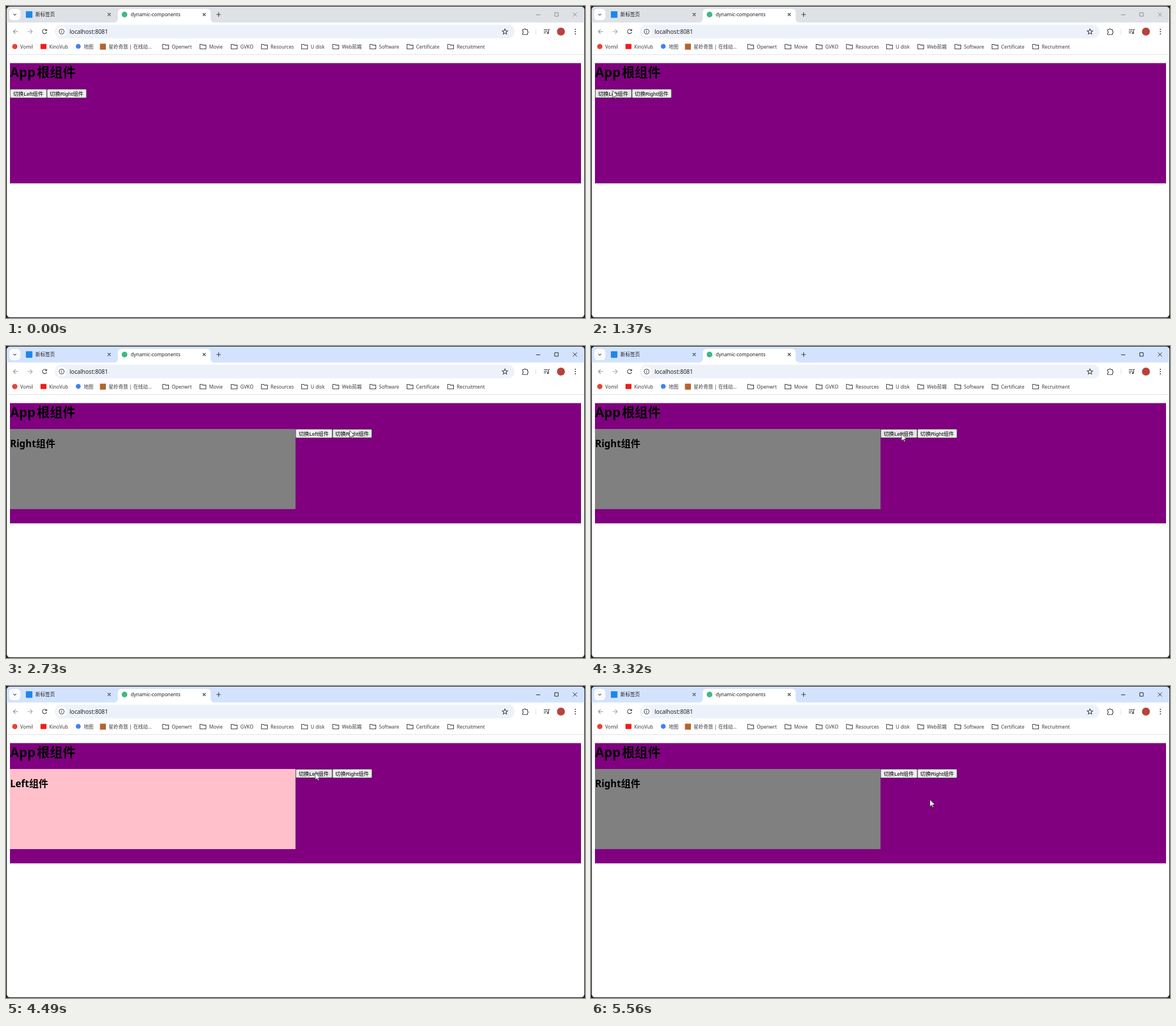
These frames come from a looping animation (1020 px wide and 549 px high, 5.6 s). An HTML page:

```html
<!DOCTYPE html>
<html lang="zh-CN">
<head>
<meta charset="utf-8">
<title>dynamic-components</title>
<style>
  html, body { margin: 0; width: 100%; height: 100%; overflow: hidden; background: #1f1f1f; }
  svg { display: block; width: 1020px; height: 549px; }
  text { font-family: "Noto Sans", "Noto Sans CJK SC", "Noto Sans CJK", sans-serif; white-space: pre; fill: #1f1f1f; }
  .ui { font-size: 8.6px; }
  .url { font-size: 10px; }
  .mark { font-size: 8.55px; fill: #3a3c3f; }
  .h1 { font-size: 22.8px; font-weight: 700; fill: #000; }
  .h2 { font-size: 16.9px; font-weight: 700; fill: #000; }
  .btn text { font: 9.4px "Liberation Sans", "Noto Sans CJK SC", "Noto Sans CJK", sans-serif; fill: #000; }
  .line { fill: none; stroke: #3a3c3f; stroke-width: 1.1; }
</style>
</head>
<body>
<svg viewBox="0 0 1020 549">
  <rect width="1020" height="549" fill="#1f1f1f"/>
  <rect x="1.4" y="1.2" width="1017.4" height="546.6" rx="5.5" fill="#fff"/>
  <path id="strip" d="M1.4 29V6.7q0-5.5 5.5-5.5H1013.3q5.5 0 5.5 5.5V29z"/>

  <!-- tab strip -->
  <rect id="search" x="5.5" y="5" width="19.8" height="20" rx="6" fill="#fff"/>
  <path class="line" d="M13 13.8l2.5 2.5 2.5-2.5" stroke-width="1.3"/>
  <rect x="35" y="9.3" width="11.5" height="11.5" rx="1" fill="#1a86ee"/>
  <text class="ui" x="51.8" y="18.3">新标签页</text>
  <path d="M190 29q7 0 7-7V12q0-7 7-7H353.500q7 0 7 7V22q0 7 7 7z" fill="#fff"/>
  <circle cx="208.800" cy="15" r="5" fill="#41b883"/>
  <text class="ui" x="219.800" y="18.300">dynamic-components</text>
  <path class="line" d="M179.300 12.500l5 5m0-5l-5 5M346.700 12.500l5 5m0-5l-5 5M370.700 15h7.800m-3.900-3.900v7.800"/>
  <path id="controls" fill="none" d="M933.800 15.500h7.400M966.700 11.800h6.200v6.200h-6.200zM998.800 11.500l7 7m0-7l-7 7"/>

  <!-- toolbar -->
  <rect x="86" y="33" width="810" height="24" rx="12" fill="#edf2fa"/>
  <path class="line" d="M21.300 45h-8.300m3.900-3.900L13 45l3.900 3.900" style="stroke:#8a8c8f"/>
  <path class="line" d="M38 45h8.300m-3.900-3.900l3.900 3.900-3.900 3.900" style="stroke:#a2a4a7"/>
  <path class="line" d="M70.800 42.300a3.800 3.800 0 1 0 .8 3.700M71.700 40.700v2.700h-2.800" stroke-width="1.300"/>
  <circle cx="98" cy="45" r="8.800" fill="#fff"/>
  <circle class="line" cx="98" cy="45" r="4.300"/>
  <path class="line" d="M98 44.300v3M98 42.400v1.100"/>
  <text class="url" x="112" y="48.600">localhost:8081</text>
  <path id="star" class="line"/>
  <path class="line" stroke-width="1.300" d="M910 41.500h2.600a1.500 1.500 0 0 1 3 0h3v3a1.500 1.500 0 0 1 0 3v2.700h-8.600v-2.700a1.500 1.500 0 0 0 0-3z"/>
  <path d="M933.300 40v10" stroke="#d3e3fd"/>
  <path class="line" d="M947.500 41.500h6.800M947.500 44.300h6.800M947.500 47.100h4M955.800 47.500v-6h2.400"/>
  <circle cx="954.600" cy="47.500" r="1.600" fill="#3a3c3f"/>
  <circle cx="977.600" cy="45" r="7" fill="#b8423c"/>
  <g fill="#3a3c3f"><circle cx="1003" cy="41" r="1.100"/><circle cx="1003" cy="45" r="1.100"/><circle cx="1003" cy="49" r="1.100"/></g>

  <!-- bookmarks -->
  <circle cx="15.500" cy="71.300" r="4.600" fill="#ea4335"/>
  <rect x="60.800" y="66.800" width="10.500" height="9" rx="1" fill="#f01c1c"/>
  <circle cx="127.300" cy="71" r="4.300" fill="#3f83ee"/>
  <rect x="165.500" y="66.300" width="10.500" height="10.500" fill="#b9622f"/>
  <g id="marks"></g>
  <path d="M1.400 85.500H1018.800" stroke="#e0e3e8"/>

  <!-- page -->
  <rect x="7" y="100.500" width="1006" height="211.600" fill="#800080"/>
  <text class="h1" x="7.300" y="125.200">App</text>
  <text class="h1" x="54.300" y="125.200">根组件</text>
  <g id="left">
    <rect x="7" y="146" width="503" height="141" fill="#ffc0cb"/>
    <text class="h2" x="7.300" y="177.600">Left组件</text>
  </g>
  <g id="right">
    <rect x="7" y="146" width="503" height="141" fill="#808080"/>
    <text class="h2" x="7.300" y="177.600">Right</text>
    <text class="h2" x="53" y="177.600">组件</text>
  </g>
  <g id="buttons" class="btn">
    <rect x=".5" y="146.500" width="64" height="15" rx="1.500"/>
    <text x="5.400" y="158">切换Left组件</text>
    <rect x="65.500" y="146.500" width="69" height="15" rx="1.500"/>
    <text x="70" y="158">切换Right组件</text>
  </g>
  <g id="cursor">
    <circle id="halo" r="9" fill="#ffdc00" opacity=".72"/>
    <path d="M0 0V12.200L2.900 9.500 4.900 13.600 6.600 12.800 4.700 8.900 8.800 8.700z" fill="#fff" stroke="#222" stroke-width=".7"/>
  </g>
</svg>
<script>
const LOOP = 5600;
const $ = id => document.getElementById(id);

const links = [[25, 'Vomil'], [76, 'KinoVub'], [137, '地图'], [180.8, '星岭奇旅 | 在线动...']];
const folders = [[292, 'Openwrt'], [357.7, 'Movie'], [412.7, 'GVKO'], [466, 'Resources'], [536.7, 'U disk'],
  [591.7, 'Web前端'], [657, 'Software'], [722.5, 'Certificate'], [794, 'Recruitment']];
const label = ([x, name]) => `<text class="mark" x="${x}" y="74.6">${name}</text>`;
const folder = ([x]) => `<path class="line" d="M${x - 16} 67.500h3.600l1.300 1.400h5.600v6.600h-10.500z"/>`;
$('marks').innerHTML = links.map(label).join('') + folders.map(f => folder(f) + label(f)).join('');

const star = Array.from({ length: 10 }, (_, i) => {
  const r = i % 2 ? 2.3 : 5, a = i * Math.PI / 5;
  return (879 + r * Math.sin(a)).toFixed(2) + ' ' + (45.3 - r * Math.cos(a)).toFixed(2);
});
$('star').setAttribute('d', 'M' + star.join('L') + 'z');

// pointer tip: time, x, y
const path = [[190, 600, 545], [350, 475, 419], [420, 446, 386], [600, 380, 292], [730, 328, 242], [900, 230, 195],
  [1060, 146, 163], [1290, 38, 149], [1640, 38, 149], [1890, 111, 160], [2140, 431, 148], [2300, 560, 148],
  [2460, 605, 149], [3050, 606, 149], [3330, 545, 155], [3690, 545, 155], [3870, 612, 151], [4120, 612, 151],
  [4320, 545, 153], [4590, 545, 153], [4790, 609, 153], [5140, 609, 154], [5560, 597, 200]];
// press, release, panel shown on release
const clicks = [[1440, 1540, 'left'], [2530, 2630, 'right'], [3390, 3490, 'left'],
  [3880, 4000, 'right'], [4340, 4430, 'left'], [4820, 4910, 'right']];
const [first, , second] = $('buttons').children;
const SLOTS = [[first, 0, 65], [second, 65, 135]];

function tipAt(t) {
  const i = path.findIndex(p => p[0] > t);
  if (i < 0) return path[path.length - 1].slice(1);
  const [a, b] = [path[Math.max(i - 1, 0)], path[i]];
  const k = Math.max(0, (t - a[0]) / (b[0] - a[0]));
  return [a[1] + (b[1] - a[1]) * k, a[2] + (b[2] - a[2]) * k];
}

function show(el, on) { el.style.display = on ? '' : 'none'; }

function paint(t) {
  const [x, y] = tipAt(t);
  const pressed = clicks.some(([down, up]) => t >= down && t < up);
  const panel = clicks.reduce((p, [, up, name]) => t >= up ? name : p, '');
  const focused = t >= clicks[0][0];
  const base = panel ? 510 : 7;

  show($('left'), panel === 'left');
  show($('right'), panel === 'right');
  $('buttons').setAttribute('transform', `translate(${base} 0)`);
  for (const [box, from, to] of SLOTS) {
    const over = t >= 190 && y >= 146 && y < 162 && x >= base + from && x < base + to;
    box.setAttribute('fill', !over ? '#efefef' : pressed ? '#f5f5f5' : '#e5e5e5');
    box.setAttribute('stroke', !over ? '#767676' : pressed ? '#8d8d8d' : '#4f4f4f');
  }
  $('strip').setAttribute('fill', focused ? '#d3e3fd' : '#dee1e6');
  $('search').setAttribute('opacity', focused ? .85 : 1);
  $('controls').setAttribute('stroke', focused ? '#222' : '#85878b');
  $('cursor').setAttribute('transform', `translate(${x.toFixed(2)} ${y.toFixed(2)})`);
  show($('cursor'), t >= 190);
  show($('halo'), pressed);
}

function tick() {
  paint(performance.now() % LOOP);
  requestAnimationFrame(tick);
}
tick();
</script>
</body>
</html>
```
